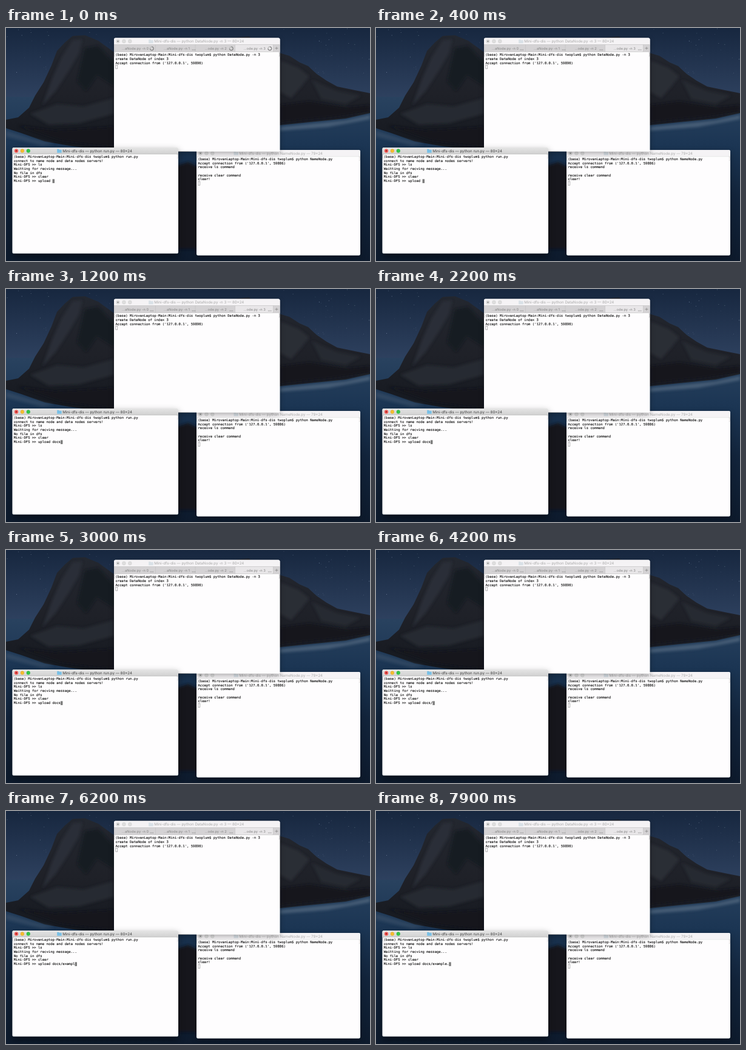
An HTML page that plays this animation: 600x386 px, repeating every 8000 ms.

```html
<!DOCTYPE html>
<html lang="en">
<head>
<meta charset="utf-8">
<title>Mini-dfs terminals</title>
<style>
  html, body { margin: 0; width: 100%; height: 100%; overflow: hidden; background: #0d1a2c; }
  svg { display: block; width: 600px; height: 386px; }
  text { white-space: pre; text-rendering: geometricPrecision; }
  .mono { font: 5.58px "DejaVu Sans Mono", monospace; fill: #0c0c0c; stroke: #0c0c0c; stroke-width: .1px; }
  .title { font: 6.18px Inter, sans-serif; }
  .tab { font: 5.75px Inter, sans-serif; fill: #858585; }
</style>
</head>
<body>
<svg id="stage" viewBox="0 0 600 386" xmlns="http://www.w3.org/2000/svg">
  <defs>
    <linearGradient id="sky" x2="0" y2="1">
      <stop offset="0" stop-color="#17273f"/><stop offset="1" stop-color="#2e415f"/>
    </linearGradient>
    <linearGradient id="sea" x2="0" y2="1">
      <stop offset="0" stop-color="#29425f"/><stop offset=".3" stop-color="#1b3553"/>
      <stop offset=".6" stop-color="#12243b"/><stop offset="1" stop-color="#0d1a2c"/>
    </linearGradient>
    <linearGradient id="rock" x2="0" y2="1">
      <stop offset="0" stop-color="#23272f"/><stop offset=".5" stop-color="#1f2128"/>
      <stop offset="1" stop-color="#14181f"/>
    </linearGradient>
    <linearGradient id="bar" x2="0" y2="1">
      <stop offset="0" stop-color="#e5e5e5"/><stop offset="1" stop-color="#d0d0d0"/>
    </linearGradient>
    <filter id="soft" x="-10%" y="-10%" width="120%" height="120%"><feGaussianBlur stdDeviation="2"/></filter>
    <filter id="shade" x="-10%" y="-10%" width="120%" height="125%">
      <feDropShadow dx="0" dy="3" stdDeviation="4" flood-opacity=".3"/>
    </filter>
    <filter id="shadeDeep" x="-12%" y="-12%" width="124%" height="130%">
      <feDropShadow dx="0" dy="5" stdDeviation="6" flood-opacity=".45"/>
    </filter>
  </defs>

  <rect width="600" height="116" fill="url(#sky)"/>
  <rect y="114" width="600" height="272" fill="url(#sea)"/>
  <g id="stars" fill="#a9b7cc"></g>
  <path d="M0 152 20 148 38 132 48 112 62 90 75 62 84 38 97 24 110 13 130 12 152 21 178 40
    230 30 400 14 450 41 467 46 484 57 498 63 512 76 528 87 546 97 575 103 600 108V141L560 150 500 156
    452 161 300 205 170 203 110 196 64 188 25 174 0 166Z" fill="url(#rock)"/>
  <g filter="url(#soft)">
    <path d="M110 20 126 19 120 42 104 70 82 104 60 128 76 84 92 48Z" fill="#2a2f39"/>
    <path d="M130 34 152 30 178 58V96L150 78 132 104 118 88Z" fill="#191b22"/>
    <path d="M40 142 84 126 128 130 178 116V142L120 158 70 160Z" fill="#272a32"/>
    <path d="M20 162 80 170 178 164V198L90 186Z" fill="#13171e"/>
    <path d="M452 54 482 66 500 80 486 98 470 116 452 106Z" fill="#2a2d36"/>
    <path d="M504 86 545 104 585 112 560 126 520 118Z" fill="#272a32"/>
    <path d="M452 128 500 122 560 132 600 128V138L540 147 452 156Z" fill="#16191f"/>
    <path d="M0 170 40 182 80 192 60 195 0 180Z" fill="#40566f" opacity=".5"/>
    <path d="M600 144 560 153 500 159 452 164V170L530 164 600 151Z" fill="#61758b" opacity=".6"/>
    <path d="M270 232 300 222 330 236V366H270Z" fill="#14171e"/>
  </g>
  <g id="windows"></g>
</svg>
<script>
const NS = 'http://www.w3.org/2000/svg';
const LOOP = 8000, ADVANCE = 3.36, PITCH = 6.7;
const PROMPT = '(base) MirovanLaptop-Main:Mini-dfs-dis twoplum$ python ';

function add(parent, tag, attrs, text) {
  const el = document.createElementNS(NS, tag);
  for (const key in attrs) el.setAttribute(key, attrs[key]);
  if (text !== undefined) el.textContent = text;
  parent.appendChild(el);
  return el;
}

function addWindow(o) {
  const g = add(windows, 'g', {});
  const { x, y, w, h, active } = o;
  add(g, 'rect', { x, y, width: w, height: h, rx: 2.6, fill: '#fefdfe',
    filter: active ? 'url(#shadeDeep)' : 'url(#shade)' });
  add(g, 'path', {
    d: `M${x} ${y + 11}V${y + 2.6}q0-2.6 2.6-2.6H${x + w - 2.6}q2.6 0 2.6 2.6V${y + 11}Z`,
    fill: active ? 'url(#bar)' : '#f5f3f5' });
  add(g, 'rect', { x, y: y + 10.7, width: w, height: .5, fill: active ? '#b1b1b1' : '#d8d8d8' });
  const lights = active ? ['#fc5b57', '#f5bd2f', '#33c748'] : Array(3).fill('#dedede');
  const rims = active ? ['#dd4340', '#d9a123', '#25a635'] : Array(3).fill('#c4c4c4');
  lights.forEach((fill, i) => add(g, 'circle', {
    cx: x + 6.5 + i * 9.9, cy: y + 5.5, r: 2.9, fill, stroke: rims[i], 'stroke-width': .4 }));
  add(g, 'circle', { cx: x + 6.5, cy: y + 5.5, r: 1.1, fill: active ? '#6e1512' : '#777' });

  const fx = o.titleX - 9, fy = y + 2.8;
  add(g, 'path', { d: `M${fx} ${fy}h2.8l.8.9h3.9v5h-7.5Z`, fill: active ? '#78c0e6' : '#d9e1e7' });
  add(g, 'text', { class: 'title', x: o.titleX, y: y + 7.8, fill: active ? '#3c3c3c' : '#a9a9a9' }, o.title);

  // prompt marks at both edges
  const my = o.base - 5.3;
  add(g, 'path', {
    d: `M${x + 2} ${my}h-1v6h1M${x + w - 2} ${my}h1v6h-1`,
    fill: 'none', stroke: '#a0a0a0', 'stroke-width': .5 });
  o.lines.forEach((line, i) => {
    if (line) add(g, 'text', { class: 'mono', x: o.textX, y: o.base + i * PITCH }, line);
  });
  if (!active) add(g, 'rect', {
    x: o.textX + .3, y: o.base + o.lines.length * PITCH - 4.9, width: 3, height: 6.1,
    fill: 'none', stroke: '#858585', 'stroke-width': .6 });
  return g;
}

const windows = document.getElementById('windows');

addWindow({
  x: 314, y: 202, w: 270, h: 174.7,
  titleX: 384.5, title: 'Mini-dfs-dis — python NameNode.py — 79×24',
  textX: 316.5, base: 218.9,
  lines: [PROMPT + 'NameNode.py', "Accept connection from ('127.0.0.1', 59886)",
    'receive ls command', '', 'receive clear command', 'clear!']
});

const data = addWindow({
  x: 178, y: 16.5, w: 273.5, h: 188,
  titleX: 244.2, title: 'Mini-dfs-dis — python DataNode.py -n 3 — 80×24',
  textX: 180.5, base: 46.2,
  lines: [PROMPT + 'DataNode.py -n 3', 'create DataNode of index 3',
    "Accept connection from ('127.0.0.1', 59890)"]
});

add(data, 'rect', { x: 178, y: 27.5, width: 273.5, height: 12, fill: '#d4d2d4' });
add(data, 'rect', { x: 377.5, y: 27.5, width: 63, height: 12, fill: '#e8e6e8' });
add(data, 'path', { d: 'M178 27.5H451.5M178 39.5H451.5M246.5 27.5v12M312 27.5v12M377.5 27.5v12M440.5 27.5v12',
  stroke: '#bcbcbc', 'stroke-width': .5 });
add(data, 'path', { d: 'M443.5 33.5h5M446 31v5', stroke: '#777', 'stroke-width': .6 });

const tabs = [
  [191, '...aNode.py -n 0', 240.3], [260, '...aNode.py -n 1', 309.5],
  [327.5, '...ode.py -n 2', 371.3], [391.5, '...ode.py -n 3', 434.8]
].map(([x, label, cx], i) => {
  add(data, 'text', { class: 'tab', x, y: 35.5 }, label);
  const dots = add(data, 'path', { d: `M${cx - 2.7} 36.2h5.4`, stroke: '#777',
    'stroke-width': .9, 'stroke-dasharray': '1.2 .9' });
  const spin = add(data, 'g', {});
  add(spin, 'circle', { cx, cy: 34, r: 2.9, fill: 'none', stroke: '#bdbdbd', 'stroke-width': 1.1 });
  add(spin, 'path', { d: `M${cx} 31.1a2.9 2.9 0 1 1-2.9 2.9`, fill: 'none',
    stroke: '#828282', 'stroke-width': 1.1 });
  return { cx, dots, spin, until: i === 1 ? 0 : 400 };
});

const run = addWindow({
  x: 10.5, y: 198, w: 273.5, h: 175.5, active: true,
  titleX: 93.2, title: 'Mini-dfs-dis — python run.py — 80×24',
  textX: 12.7, base: 214.8,
  lines: [PROMPT + 'run.py', 'connect to name node and data nodes servers!',
    'Mini-DFS >> ls', 'Waitting for recving message...', 'No file in dfs', 'Mini-DFS >> clear']
});
const cursor = add(run, 'rect', { y: 250.4, width: 3.5, height: 6.5, fill: '#7d7d7d' });
const input = add(run, 'text', { class: 'mono', x: 12.7, y: 214.8 + 6 * PITCH });

// faint stars from a seeded generator
let seed = 11;
const rand = () => (seed = seed * 16807 % 2147483647) / 2147483647;
const stars = document.getElementById('stars');
for (let i = 0; i < 60; i++) {
  add(stars, 'circle', {
    cx: rand() < .5 ? 455 + rand() * 145 : rand() * 178, cy: rand() * 75,
    r: .25 + rand() * .3, opacity: .25 + rand() * .5 });
}

const typed = 'docs/example.';
const keyTimes = [600, 800, 900, 1100, 4100, 5200, 5600, 5700, 5800, 6000, 6100, 7500, 7900];

function draw(t) {
  const count = keyTimes.filter(k => k <= t).length;
  const line = 'Mini-DFS >> upload ' + typed.slice(0, count);
  if (input.textContent !== line) input.textContent = line;
  cursor.setAttribute('x', 12.7 + line.length * ADVANCE);
  const turn = Math.floor(t / 100) * 45;
  for (const tab of tabs) {
    const busy = t < tab.until;
    tab.spin.setAttribute('visibility', busy ? 'visible' : 'hidden');
    tab.dots.setAttribute('visibility', busy ? 'hidden' : 'visible');
    tab.spin.setAttribute('transform', `rotate(${turn} ${tab.cx} 34)`);
  }
}

const start = performance.now();
function tick() {
  draw((performance.now() - start) % LOOP);
  requestAnimationFrame(tick);
}
draw(0);
requestAnimationFrame(tick);
</script>
</body>
</html>
```
